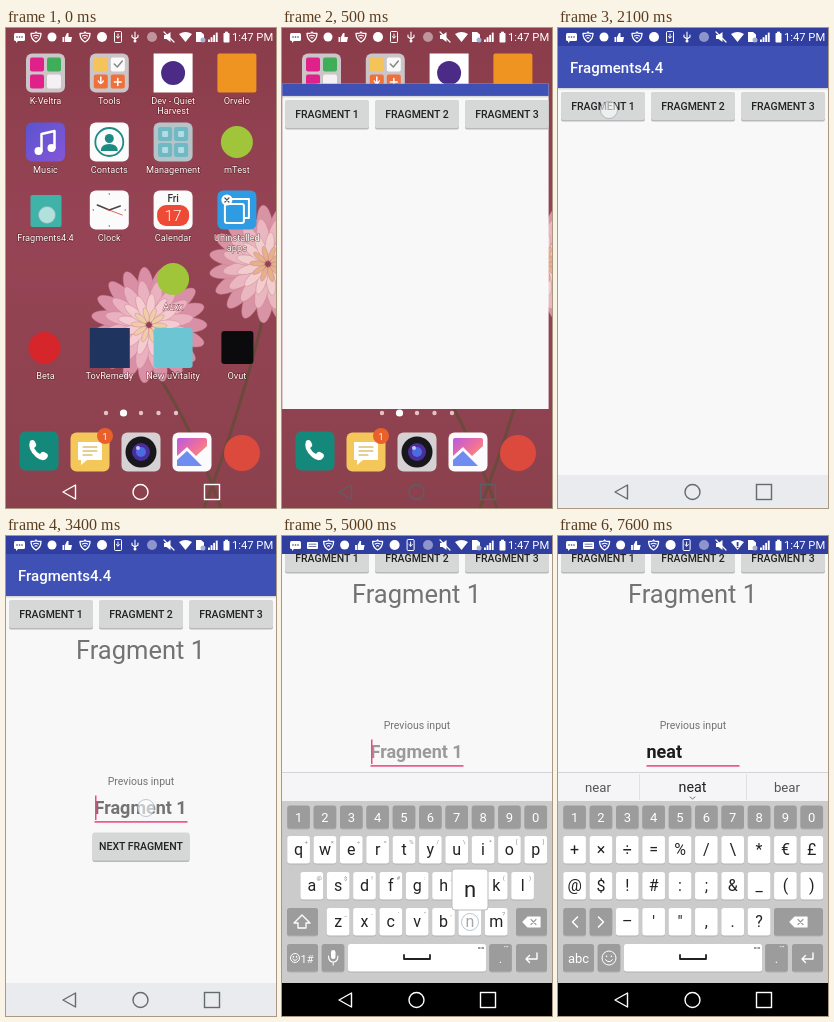
Write an HTML page that moves like this. It is 270x480 px and loops after 8 s.

```html
<!DOCTYPE html>
<html lang="en">
<head>
<meta charset="utf-8">
<title>Fragments4.4</title>
<style>
  html, body { margin: 0; height: 100%; overflow: hidden; }
  svg { display: block; width: 100vw; height: 100vh; font-family: Roboto, sans-serif; }
  text { text-anchor: middle; white-space: pre; }
  .left { text-anchor: start; }
  .med { font-weight: 500; }
  .bold { font-weight: 700; }
  .label { paint-order: stroke; stroke: #4008; stroke-width: 1px; }
  .line { fill: none; stroke-linejoin: round; stroke-linecap: round; }
</style>
</head>
<body>
<svg id="stage" viewBox="0 0 270 480"></svg>
<script>
const LOOP = 8000, STEP = 100;

// Drawing helpers, all returning SVG markup
const rect = (x, y, w, h, fill, r = 0, more = '') =>
  `<rect x="${x}" y="${y}" width="${w}" height="${h}" rx="${r}" fill="${fill}" ${more}/>`;
const disc = (x, y, r, fill, more = '') => `<circle cx="${x}" cy="${y}" r="${r}" fill="${fill}" ${more}/>`;
const text = (x, y, s, size, fill, cls = '', more = '') =>
  `<text x="${x}" y="${y}" font-size="${size}" fill="${fill}" class="${cls}" ${more}>${s.replace(/&/g, '&amp;').replace(/</g, '&lt;')}</text>`;
const fillPath = (d, fill) => `<path d="${d}" fill="${fill}"/>`;
const line = (d, stroke, w = 1.5) => `<path class="line" d="${d}" stroke="${stroke}" stroke-width="${w}"/>`;
const group = (id, body, more = '') => `<g id="${id}" ${more}>${body}</g>`;
const at = (x, y, body) => `<g transform="translate(${x} ${y})">${body}</g>`;

// Home screen
function flower(x, y, r, tones) {
  return tones.map((tone, k) => {
    const n = 19 - 3 * k, len = r * (1 - .23 * k);
    return Array.from({ length: n }, (_, i) =>
      `<ellipse cx="${len * .58}" rx="${len * .42}" ry="${len * .14}" fill="${tone}" stroke="#c9808f" stroke-width=".4"
        transform="translate(${x} ${y}) rotate(${i * 360 / n + k * 13})"/>`).join('');
  }).join('');
}

const wallpaper = () =>
  rect(0, 0, 270, 480, 'url(#wall)') +
  line('M150 345Q182 390 215 480', '#6b4a3c', 3) +
  line('M258 285Q236 380 198 480', '#6b4a3c', 3) +
  flower(262, 236, 59, ['#d893a5', '#eab6c0', '#f1cdcd', '#e6b088']) +
  flower(143, 297, 58, ['#d98fa5', '#eab1c0', '#f3cbd0', '#efcda6']);

const tile = (fill, body = '') => rect(-19.5, -19.5, 39, 39, fill, 6) + body;
const folder = colors => tile('#cbc5c8', colors.map((c, i) =>
  rect(-15.5 + i % 2 * 17, -15.5 + (i >> 1) * 17, 14, 14, c, 2)).join(''));

const apps = [
  [0, 45, ['K-Veltra'], folder(['#e0218a', '#3fae58', '#e0218a', '#f4f0f4'])],
  [1, 45, ['Tools'], folder(['#f4c35a', '#fafafa', '#f0703c', '#f0703c']) +
    line('M5 -9l3 3l5 -6', '#888') + line('M-8.500 4v6M-11 8q2.500 5 5 0M5 9h7M8.500 5.500v7', '#fff')],
  [2, 45, ['Dev - Quiet', 'Harvest'], rect(-19.5, -19.5, 39, 39, '#fff') + disc(0, 0, 12, '#4b2b86')],
  [3, 45, ['Orvelo'], rect(-19.5, -19.5, 39, 39, '#ef9420', 2)],
  [0, 114, ['Music'], tile('url(#music)', line('M-4 9V-8L9 -11V6', '#fff', 2.5) + disc(-7, 9, 4, '#fff') + disc(6, 6, 4, '#fff'))],
  [1, 114, ['Contacts'], tile('#fbfbfb', disc(0, 0, 14, 'none', 'stroke="#1d8a84" stroke-width="1.800"') +
    disc(0, -3.5, 4.5, '#1d8a84') + fillPath('M-8.500 9q0 -7 8.500 -7t8.500 7z', '#1d8a84'))],
  [2, 114, ['Management'], tile('#b5c4c8', [0, 1, 2, 3].map(i =>
    rect(-15 + i % 2 * 16, -15 + (i >> 1) * 16, 14, 14, '#6fb9c4', 2) +
    rect(-11 + i % 2 * 16, -11 + (i >> 1) * 16, 6, 6, '#b5dbe0', 1)).join(''))],
  [3, 114, ['mTest'], disc(0, 0, 16, '#a0c53a')],
  [0, 182, ['Fragments4.4'], rect(-15, -15, 31, 32, '#3fb3a8', 2)],
  [1, 182, ['Clock'], tile('#fbfbfb', line('M0 0L-12 -5M0 0L11 -4', '#444') + line('M-3 -1L13 5', '#e53935', .8) +
    [0, 1, 2, 3].map(i => disc(16 * Math.cos(i * Math.PI / 2), 16 * Math.sin(i * Math.PI / 2), .8, '#777')).join(''))],
  [2, 182, ['Calendar'], tile('#fbfbfb', text(0, -8, 'Fri', 10, '#333', 'med') +
    rect(-16, -5, 32, 21, '#ee4a35', 9) + text(0, 11, '17', 15.5, '#fff', '', 'font-weight="300"'))],
  [3, 182, ['Uninstalled', 'apps'], tile('#2f9be3', line('M-7 -6V-11H12V8H7', '#fff', 2) + rect(-12, -6, 19, 19, '#2f9be3', 2, 'stroke="#fff" stroke-width="2"')) +
    disc(-10, -10, 5.5, '#fff') + line('M-12 -12l4 4m0 -4l-4 4', '#555', 1.2)],
  [2, 251, ['Auxx'], disc(0, 0, 16, '#a0c53a')],
  [0, 320, ['Beta'], disc(-1, 0, 16, '#d6252b')],
  [1, 320, ['TovRemedy'], rect(-19.5, -20, 40, 40, '#1f355f')],
  [2, 320, ['New uVitality'], rect(-19.5, -20, 39, 40, '#6cc5d2', 3)],
  [3, 320, ['Ovut'], rect(-15.5, -17, 32, 33, '#0b0b0d', 3)],
];

const dock = () =>
  at(33, 423, tile('#14897b') + fillPath('M-9 -10q4 -3 6 3q1 2 -2 4q2 4 6 6q2 -3 4 -2q6 2 3 6q-4 5 -11 -1q-9 -8 -6 -16z', '#fff')) +
  at(84, 424, tile('#f4c75a') + fillPath('M-12 -10h24v18h-15l-6 5v-5h-3z', '#fff') +
    line('M-7 -5h14M-7 -1h14M-7 3h9', '#caa12f', 1.2) + disc(15, -16, 8, '#e9602c') + text(15, -12.5, '1', 9, '#fff')) +
  at(135, 424, tile('#d6d1d2') + disc(0, 0, 15.5, '#17171c') + disc(0, 0, 9, '#4a2f9b') + disc(0, 0, 5, '#4c6be0') + disc(-3, -4, 2, '#c9c4ff')) +
  at(186, 424, tile('#fbfbfd') + rect(-15, -14, 30, 28, 'url(#sky)', 2) +
    fillPath('M-15 14V4L-5 -5L4 4L15 -6V14z', '#fbfbfd') + fillPath('M-15 14V8L-5 -1L10 14z', '#6f8df0')) +
  at(236, 425, disc(0, 0, 18, '#dc4a3d'));

const home = () => wallpaper() +
  apps.map(([col, y, names, icon]) => {
    const x = 39.5 + col * 63.8;
    return at(x, y, icon) + names.map((n, i) => text(x, y + 30.5 + i * 10.5, n, 9.2, '#fff', 'label')).join('');
  }).join('') +
  [0, 1, 2, 3, 4].map(i => disc(100 + i * 17.5, 385, i == 1 ? 3.6 : 2.2, i == 1 ? '#fff' : '#e3c3c9')).join('') +
  dock();

// App screen
const button = (x, y, w, s) =>
  rect(x, y + 1, w, 28.5, '#b9b9ba', 2) + rect(x, y, w, 28, '#d6d7d7', 2) +
  text(x + w / 2, y + 17.8, s, 10.5, '#222', 'med');

const app = () =>
  rect(0, 0, 270, 480, '#f9f8f9') +
  group('pan',
    rect(0, 18, 270, 42, '#3f51b5') + rect(0, 60, 270, 1.5, '#0002') +
    text(12, 45, 'Fragments4.4', 15, '#fff', 'left med') +
    [1, 2, 3].map(i => button(90 * i - 87, 64, 84, 'FRAGMENT ' + i)).join('') +
    rect(3, 64, 84, 28, '#000', 2, 'id="ripple" opacity=".1"') +
    group('fragment',
      text(134.5, 123, 'Fragment 1', 25.5, '#737373') +
      text(135, 248.7, 'Previous input', 10.5, '#737373') +
      text(88.5, 278, '', 18, '#737373', 'left bold', 'id="input"') +
      rect(88.5, 285.2, 93, 1.4, '#888', 0, 'id="under"') +
      rect(89, 259.5, 1.5, 24.5, '#ff4081', 0, 'id="cursor"') +
      button(86.5, 296.5, 97, 'NEXT FRAGMENT'))) +
  rect(0, 0, 270, 18, '#303f9f') + rect(0, 447, 270, 33, '#e9ebee');

// Keyboard
const DARK = '#9c9c9c', PITCH = 26.35, FIRST = 16.6;
const keyCap = (x, y, w, s, dark, h = 27.5) =>
  rect(x - w / 2, y + 1, w, h, '#0002', 2.5) + rect(x - w / 2, y, w, h, dark ? DARK : '#fff', 2.5) +
  text(x, y + h / 2 + 5, s, dark ? 13 : 16, dark ? '#fff' : '#222');
const keyRow = (s, x, y, hints = '') => [...s].map((c, i) =>
  keyCap(x + i * PITCH, y, 22.6, c) +
  (hints ? text(x + i * PITCH + 7.5, y + 7.5, hints[i], 6, '#888') : '')).join('');
const face = (x, y, r) => disc(x, y, r, 'none', 'stroke="#fff"') + disc(x - r * .35, y - r * .25, .8, '#fff') +
  disc(x + r * .35, y - r * .25, .8, '#fff') + line(`M${x - r * .5} ${y + r * .25}q${r * .5} ${r * .6} ${r} 0`, '#fff', 1);
const eraser = x => line(`M${x - 8} 386l5 -5h12v10h-12z`, '#fff', 1.2) +
  fillPath(`M${x - 8} 386l5 -5h12v10h-12z`, '#fff') + line(`M${x} 383.500l5 5m0 -5l-5 5`, DARK, 1.2);

const keyboard = () =>
  rect(0, 236, 270, 30, '#f5f5f7') + rect(0, 236, 270, 1, '#d4d4d6') + rect(0, 265, 270, 215, '#cbcbcb') +
  group('words',
    text(134.5, 255.5, '', 14.3, '#222', '', 'id="word"') +
    group('sides', text(40, 255.5, 'near', 13.2, '#555') + text(229, 255.5, 'bear', 13.2, '#555') +
      rect(81, 238, 1, 26, '#e0e0e2') + rect(188, 238, 1, 26, '#e0e0e2') + line('M132 261l2.500 2l2.500 -2', '#777', 1))) +
  [...'1234567890'].map((c, i) => keyCap(FIRST + i * PITCH, 269.5, 22.6, c, true, 23)).join('') +
  group('letters',
    keyRow('qwertyuiop', FIRST, 300, '+×÷=%/\\*[]') + keyRow('asdfghjkl', 29.8, 336, '@$!#:;&()') + keyRow('zxcvbnm', 56.1, 372, '_-\'",.?') +
    keyCap(20.5, 372, 31, '', true) + line('M20 379l8 8h-4v5h-8v-5h-4z', '#fff', 1.3) +
    keyCap(249.5, 372, 31, '', true) + eraser(249) +
    keyCap(20.5, 408, 31, '', true) + face(13, 422, 4.5) + text(25, 426.5, '1#', 11, '#fff') +
    keyCap(51, 408, 22.6, '', true) + rect(49, 414, 4.5, 9, '#fff', 2.2) + line('M46.500 420q0 6 4.700 6t4.700 -6M51.200 426v3', '#fff', 1.1)) +
  group('symbols',
    keyRow('+×÷=%/\\*€£', FIRST, 300) + keyRow('@$!#:;&_()', FIRST, 336) + keyRow('–\'",.?', FIRST + 2 * PITCH, 372) +
    keyCap(FIRST, 372, 22.6, '', true) + line('M19.500 381l-5 5l5 5', '#fff') +
    keyCap(FIRST + PITCH, 372, 22.6, '', true) + line('M40.500 381l5 5l-5 5', '#fff') +
    keyCap(240.5, 372, 49, '', true) + eraser(240) +
    keyCap(20.5, 408, 31, 'abc', true) + keyCap(51, 408, 22.6, '', true) + face(51, 422, 7)) +
  keyCap(135, 408, 138, '') + line('M122 419v4h26v-4', '#222', 1.8) + rect(196, 411, 2.5, 2, '#999') + rect(199.500, 411, 2.5, 2, '#999') +
  keyCap(218.5, 408, 22.6, '.', true) + text(224, 413, '•••', 5, '#fff') +
  keyCap(249.5, 408, 31, '', true) + line('M255 417v6h-11m3.500 -3.500l-3.500 3.500l3.500 3.500', '#fff', 1.4);

// System bars
const shield = x => line(`M${x - 5} 5.500q5 0 5 -1.500q0 1.500 5 1.500q0 6 -5 8.500q-5 -2.500 -5 -8.500z`, '#fff', 1.3) +
  line(`M${x - 2.5} 8q2.500 -1.500 5 0M${x - 1} 10q1 -.7 2 0`, '#fff', 1.2);
const status = () =>
  rect(8, 5, 11, 8, '#fff', 1.5) + fillPath('M10 12v3l3 -3z', '#fff') + [11, 13.5, 16].map(x => disc(x, 9, .8, '#3a3a68')).join('') +
  group('board', rect(25, 6, 11, 7, '#fff', 1) + line('M27 8.200h7M27 10.500h7', '#555c90', .8)) +
  group('notes', shield(30) + disc(46, 9, 4.5, '#fff') +
    fillPath('M59 14V9l2 -4h1.500v4h3.500l-1 5z', '#fff') + rect(56.500, 9, 1.8, 5, '#fff') +
    shield(79) + disc(96, 9, 5, '#fff') + rect(108.500, 3.5, 7, 11, 'none', 1, 'stroke="#fff"') + line('M112 6v4m-1.700 -1.500l1.700 1.700l1.700 -1.700', '#fff', 1)) +
  group('usb', line('M129 13V4m-3 3v2l3 2l3 -2v-2', '#fff', 1.1) + disc(129, 13, 1.5, '#fff')) +
  disc(146, 9, 5, '#fff', 'opacity=".45"') +
  fillPath('M158 7h2.500l4 -3v10l-4 -3h-2.500z', '#fff') + line('M158 4l10 10', '#fff', 1.2) +
  fillPath('M173 6q6.500 -4 13 0l-6.500 8z', '#fff') + group('alert', rect(178.700, 6, 1.8, 4, '#303f9f') + rect(178.700, 10.700, 1.8, 1.300, '#303f9f')) +
  fillPath('M190 4h5l3 2.500v7.500h-8z', '#fff') + disc(197, 12, 2.5, '#a9b0d8') +
  [0, 1, 2, 3].map(i => rect(202 + i * 2.6, 11.5 - i * 2.3, 1.9, 2.5 + i * 2.3, '#fff')).join('') +
  rect(217.5, 5, 6, 9.5, '#fff', .8) + rect(219, 3.7, 3, 2, '#fff') +
  text(226, 13.2, '1:47 PM', 11.2, '#fff', 'left');

const nav = () => group('nav', line('M69.500 457v14l-12.500 -7z', 'currentColor', 1.4) +
  disc(134.5, 464, 7.5, 'none', 'stroke="currentColor" stroke-width="1.400"') +
  rect(198.500, 456.500, 15, 15, 'none', 0, 'stroke="currentColor" stroke-width="1.400"'));

const stage = document.getElementById('stage');
stage.innerHTML =
  `<defs>
    <linearGradient id="wall" x2="0" y2="1"><stop stop-color="#8a3c4a"/><stop offset=".4" stop-color="#964455"/><stop offset="1" stop-color="#8b414d"/></linearGradient>
    <linearGradient id="music" x2="1" y2="1"><stop stop-color="#5b54cf"/><stop offset="1" stop-color="#8456d8"/></linearGradient>
    <linearGradient id="sky" x2="1" y2="1"><stop stop-color="#b95be0"/><stop offset=".5" stop-color="#f0709a"/><stop offset="1" stop-color="#f8b24a"/></linearGradient>
    <clipPath id="reveal"><rect id="hole"/></clipPath>
  </defs>` +
  group('home', home()) + group('app', app(), 'clip-path="url(#reveal)"') +
  group('keys', keyboard()) + rect(0, 447, 270, 33, '#000', 0, 'id="shade"') +
  group('popup', rect(-18, -53, 36, 41, '#fff', 3, 'stroke="#bbb"') + text(0, -25, '', 22, '#222', '', 'id="letter"')) +
  group('touch', disc(0, 0, 8.5, '#fff', 'fill-opacity=".6" stroke="#8aa4b8" stroke-opacity=".6"')) +
  status() + nav();

const el = {};
stage.querySelectorAll('[id]').forEach(e => el[e.id] = e);

// Timeline
const presses = [['n', 188, 386, 5000], ['e', 69.3, 314, 5300], ['a', 29.8, 350, 5600], ['t', 122, 314, 6000]];
const taps = [[41, 187, 0], [51, 82, 2100], [140, 272, 3400], [20, 422, 6400], ...presses.map(p => p.slice(1))];

const show = (name, on) => el[name].style.display = on ? '' : 'none';
const move = (name, x, y) => el[name].setAttribute('transform', `translate(${x} ${y})`);
const set = (name, attrs) => Object.entries(attrs).forEach(([k, v]) => el[name].setAttribute(k, v));
const within = (t, a, b) => t >= a && t < b;
const track = (t, points) => {
  const i = points.findIndex(p => p[0] > t);
  if (i == 0) return points[0][1];
  if (i < 0) return points[points.length - 1][1];
  const [[a, u], [b, v]] = [points[i - 1], points[i]];
  return u + (v - u) * (t - a) / (b - a);
};

// The window grows out of its icon while it settles upwards
function openApp(t) {
  const u = Math.min(1, Math.max(0, (t - 360) / 350));
  const py = 1 - (1 - u) ** 2, px = 1 - (1 - u) ** 8;
  const x = 14 * (1 - px), y = 155 * (1 - py), drop = 22 * (1 - py);
  show('home', t < 800);
  show('app', u > 0);
  set('hole', { x, y: y - drop, width: 68 + 202 * px - x, height: 205 + 275 * py - y });
  move('app', 0, drop);
}

function typeText(t) {
  const typed = presses.filter(p => t >= p[3] + 100).map(p => p[0]).join('');
  el.input.textContent = typed || 'Fragment 1';
  set('input', { fill: typed ? '#1c1c1c' : t < 3600 ? '#737373' : '#9a9a9a' });
  set('under', { fill: t < 3400 ? '#888' : '#f0307a' });
  show('cursor', within(t, 3400, 4000) || within(t, 4500, 6600) || within(t, 7100, 7600));
  set('cursor', { x: 89 + (typed ? el.input.getComputedTextLength() : 0) });

  const done = t >= 6200, cut = done ? typed.length : typed.length - 1;
  el.word.innerHTML = typed && `${typed.slice(0, cut)}<tspan fill="#36b4ee">${typed.slice(cut)}</tspan>`;
  el.word.style.fontWeight = done ? 400 : 700;
  show('sides', done);
}

function render(t) {
  openApp(t);
  show('ripple', within(t, 2200, 2600));
  show('fragment', t >= 2400);

  move('pan', 0, -track(t, [[4200, 0], [4300, 24], [4400, 48], [4500, 55], [4600, 56]]));
  move('keys', 0, track(t, [[4200, 100], [4300, 72], [4400, 39], [4500, 10], [4600, 0]]));
  el.keys.style.opacity = track(t, [[4200, 0], [4300, .25], [4400, .6], [4500, .9], [4600, 1]]);
  const top = track(t, [[4400, 432], [4500, 443], [4600, 447]]);
  set('shade', { y: top, height: 480 - top, opacity: track(t, [[4200, 0], [4300, .3], [4400, .56], [4500, .85], [4600, 1]]) });
  show('letters', t < 6500);
  show('symbols', t >= 6500);
  typeText(t);

  const press = presses.find(p => within(t, p[3], p[3] + 200));
  show('popup', press);
  if (press) {
    el.letter.textContent = press[0];
    move('popup', press[1], press[2]);
  }
  const tap = taps.find(p => within(t, p[2], p[2] + 200));
  show('touch', tap);
  if (tap) move('touch', tap[0], tap[1]);

  const ime = t >= 4200;
  show('board', ime);
  show('usb', !ime);
  move('notes', ime ? 16.6 : 0, 0);
  show('alert', t >= 7200);
  el.nav.style.color = t < 400 || t >= 4300 ? '#fff' : t < 700 ? '#5c5f66' : '#636a70';
}

let last = -1;
function tick() {
  const t = Math.floor(performance.now() % LOOP / STEP) * STEP;
  if (t != last) render(last = t);
  requestAnimationFrame(tick);
}
tick();
</script>
</body>
</html>
```
